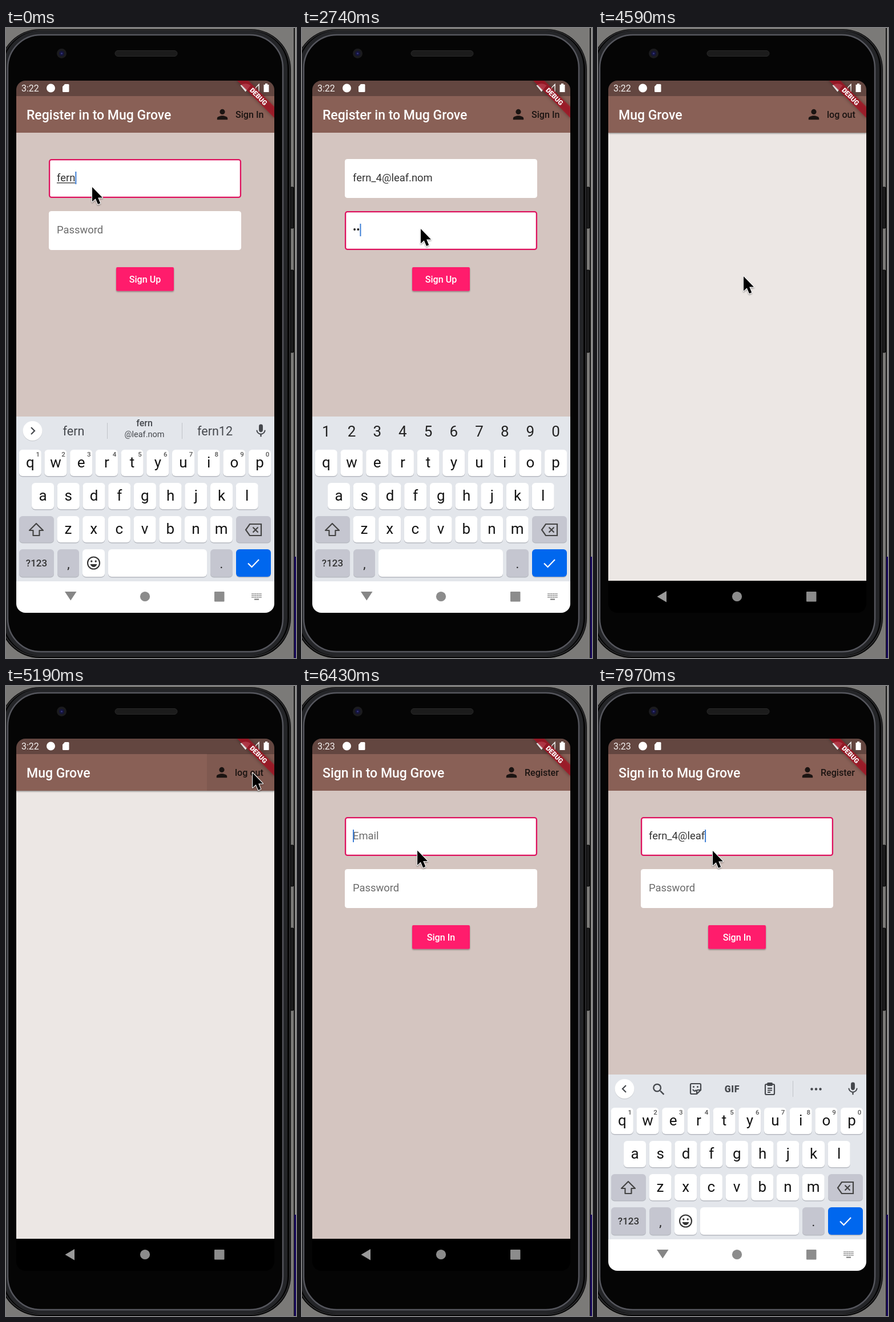
These frames come from a looping animation (508x1101 px, 8000 ms). An HTML page:

```html
<!DOCTYPE html>
<html lang="en">
<head>
<meta charset="utf-8">
<title>Sign-up demo</title>
<style>
html, body { margin: 0; width: 100%; height: 100%; overflow: hidden; background: #7b7a78; }
svg { display: block; width: 100vw; height: 100vh; }
text { font-family: Roboto, sans-serif; white-space: pre; }
.m { font-weight: 500; }
.c { text-anchor: middle; }
</style>
</head>
<body>
<svg id="stage" viewBox="0 0 508 1101"></svg>
<script>
const APP = 'Mug Grove', USER = 'fern', MAIL = 'fern_4@leaf.nom';
const INK = '#45484d';

// Markup helpers
const rect = (x, y, w, h, r, fill, more = '') =>
  `<rect x="${x}" y="${y}" width="${w}" height="${h}" rx="${r}" fill="${fill}" ${more}/>`;
const disc = (x, y, r, fill, more = '') => `<circle cx="${x}" cy="${y}" r="${r}" fill="${fill}" ${more}/>`;
const text = (x, y, size, str, fill, more = '') =>
  `<text x="${x}" y="${y}" font-size="${size}" fill="${fill}" ${more}>${str}</text>`;
const path = (d, fill, more = '') => `<path d="${d}" fill="${fill}" ${more}/>`;
const line = (d, color, width, more = '') => path(d, 'none', `stroke="${color}" stroke-width="${width}" ${more}`);
const icon = (cx, cy, d, fill, s = 1.15) =>
  `<g transform="translate(${cx} ${cy}) scale(${s}) translate(-12 -12)">${path(d, fill)}</g>`;
const group = (id, body, more = '') => `<g id="${id}" ${more}>${body}</g>`;

const PERSON = 'M12 12a4 4 0 1 0 0-8 4 4 0 0 0 0 8zm0 2c-2.67 0-8 1.34-8 4v2h16v-2c0-2.66-5.33-4-8-4z';
const SEARCH = 'M15.5 14h-.79l-.28-.27A6.47 6.47 0 0 0 16 9.5 6.5 6.5 0 1 0 9.5 16c1.61 0 3.09-.59 4.23-1.57l.27.28v.79l5 4.99L20.49 19zM9.5 14a4.5 4.5 0 1 1 0-9 4.5 4.5 0 0 1 0 9z';
const MIC = 'M12 14c1.66 0 3-1.34 3-3V5a3 3 0 0 0-6 0v6c0 1.66 1.34 3 3 3zm5.3-3c0 3-2.54 5.1-5.3 5.1S6.7 14 6.7 11H5c0 3.41 2.72 6.23 6 6.72V21h2v-3.28c3.28-.48 6-3.3 6-6.72z';

function phone() {
  const ring = (x, y, r, color, w) =>
    rect(x, y, 488 - 2 * x, 1102 - 2 * y, r, 'none', `stroke="${color}" stroke-width="${w}"`);
  return rect(0, 0, 508, 1101, 0, '#7b7a78') +
    rect(504, 0, 2, 1101, 0, '#111') + rect(506, 0, 2, 924, 0, '#8d8c8a') +
    rect(505, 924, 3, 177, 0, '#1a0b5c') +
    rect(498, 278, 6, 72, 2, '#1c1c1d', 'stroke="#000"') +
    rect(498, 423, 6, 144, 2, '#1c1c1d', 'stroke="#000"') +
    rect(-11, 2, 510, 1099, 70, '#050505') +
    ring(-9, 4, 68, '#2b2b2d', 2) + ring(-1, 9, 62, '#242528', 8) + ring(3, 12, 58, '#55565d', 2.5) +
    disc(97.5, 44.5, 8.5, '#1b1b1e') + disc(97.5, 44.5, 4.5, '#14143a') + disc(97.5, 44.5, 1.6, '#34347c') +
    rect(191, 39.5, 109, 10, 5, '#1c1c1c', 'stroke="#292929"');
}

function statusBar() {
  return rect(18, 92, 452, 27, 0, '#634640') +
    text(27, 111, 16, '3:22', '#f4f0ef', 'id="clock"') + disc(78.5, 105, 7.5, '#fff') +
    path('M103 98h6q1.5 0 1.5 1.5v11q0 1.5-1.5 1.5h-8.500q-1.5 0-1.500-1.500v-8z', '#fff') +
    path('M419.500 111.500L410.500 100.500Q419.500 94 428.500 100.500z', '#fff') +
    line('M431 111L443 98.500V111z', '#fff', 1.4) + path('M431 111.500l7-7.500v7.500z', '#fff') +
    path('M454 97h4v2h2.500v13h-9V99h2.500z', '#fff');
}

const banner = () => `<g transform="translate(470 92) rotate(45)">` +
  rect(-46, 32.2, 92, 13.8, 0, '#a5161f', 'fill-opacity=".75" filter="url(#soft)"') +
  text(0, 43.3, 11.7, 'DEBUG', '#fff', 'class="c" font-weight="900"') + '</g>';

function form() {
  const field = (id, y) => rect(75, y, 337, 68, 4.600, '#fff') +
    rect(76.100, y + 1.100, 334.800, 65.800, 3.5, 'none', `id="${id}Ring" stroke="#dd115d" stroke-width="2.300"`) +
    text(89, y + 39, 18.4, '', '#333', `id="${id}"`);
  return rect(18, 183, 452, 783, 0, '#d4c5c0') + field('mail', 229) + field('pass', 320) +
    rect(89, 270, 10, 1.3, 0, '#333', 'id="under"') + rect(120, 251, 2, 22, 0, '#3e7fd6', 'id="caret"') +
    rect(193, 418, 101, 41.500, 2.300, '#ff1d6c', 'id="button" filter="url(#low)"') +
    text(243.500, 444.500, 16.1, '', '#fff', 'id="buttonText" class="m c"');
}

function key(x, y, w, fill = '#fff', h = 46) {
  return rect(x, y + 1.4, w, h, 6, '#b7bac1') + rect(x, y, w, h, 6, fill);
}

function keyboard() {
  const GREY = '#c5c6d0', at = i => 42.300 + 44.700 * i;
  const row = (str, x0, y) => [...str].map((c, i) => key(x0 + 44.700 * i - 19.500, y, 39) +
    text(x0 + 44.700 * i, y + 31, 26, c, '#141414', 'class="c"')).join('');
  const digits = [...'1234567890'];
  const round = 'stroke-linecap="round" stroke-linejoin="round"';
  const opener = d => disc(46.500, 705, 17, '#c5c8cd') + disc(46.500, 704, 17, '#fff') + line(d, INK, 2.200);
  const mic = icon(446.500, 704, MIC, INK);
  const divider = x => rect(x, 690, 1, 28, 0, '#c0c3c8');

  const words = opener('M44 698l6 6-6 6') + divider(177) + divider(308) + mic +
    [118.500, 242.500, 366].map((x, i) => text(x, 712, 21.500, '', INK, `id="word${i}" class="c"`)).join('') +
    group('pair', text(242.500, 696, 16, USER, INK, 'class="m c"') +
      text(242.500, 715, 14.500, '@leaf.nom', INK, 'class="c"'));
  const tools = opener('M49 698l-6 6 6 6') + icon(106.500, 705, SEARCH, INK) +
    line('M164 695h14q2 0 2 2v9l-7 7h-9q-2 0-2-2v-14q0-2 2-2zM180 706h-5q-2 0-2 2v5M166 705q3 5 6 1', INK, 2.200) +
    disc(167.500, 700.500, 1.5, INK) + disc(174.500, 700.500, 1.5, INK) +
    text(235, 710, 16, 'GIF', INK, 'class="c" font-weight="900" letter-spacing=".6"') +
    rect(293, 696, 16, 18, 2, 'none', `stroke="${INK}" stroke-width="2.200"`) + rect(296, 693, 10, 6, 2, INK) +
    line('M297 703h8M297 706.500h8M297 710h5', INK, 1.800) + divider(341) +
    [374.500, 382, 389.500].map(x => disc(x, 704.500, 2.200, INK)).join('') + mic;
  const numbers = digits.map((d, i) => text(at(i), 714, 26, d, '#222', 'class="c"')).join('');
  const hints = digits.map((d, i) => text(at(i) + 13.500, 749, 11.500, d, '#555', 'class="m c"')).join('');
  const emoji = key(134, 911, 39, '#fff', 48) + disc(153.500, 935, 10.500, 'none', 'stroke="#333" stroke-width="2.100"') +
    disc(149.800, 932, 1.700, '#333') + disc(157.200, 932, 1.700, '#333') + path('M147.500 937h12q-2 5-6 5t-6-5z', '#333');

  return rect(18, 679, 452, 288, 0, '#e3e6eb') +
    group('words', words) + group('tools', tools) + group('numbers', numbers) +
    row('qwertyuiop', at(0), 737) + group('hints', hints) +
    row('asdfghjkl', 64.600, 795) + row('zxcvbnm', 109, 853) +
    key(23, 853, 61, GREY) + line('M53 866l12 12h-6.500v9h-11v-9H41z', '#444', 2.200, round) +
    key(403, 853, 61, GREY) + line('M427 867h20v20h-20l-7-10zM432.500 872.500l9 9M441.500 872.500l-9 9', '#444', 2.200) +
    key(23, 911, 61, GREY, 48) + text(53.500, 941, 17, '?123', '#333', 'class="m c"') +
    key(90, 911, 38, GREY, 48) + text(109.500, 944, 22, ',', '#222', 'class="c"') +
    group('emoji', emoji + key(179, 911, 173, '#fff', 48)) + group('space', key(134, 911, 218, '#fff', 48)) +
    key(358, 911, 39, GREY, 48) + text(377.500, 944, 22, '.', '#222', 'class="c"') +
    key(403, 911, 61, '#0067ee', 48) + line('M424 935.500l6.500 6.500 12.500-13', '#fff', 2.200);
}

function navBar() {
  const dots = [];
  for (let r = 0; r < 3; r++) for (let i = 0; i < 6; i++) dots.push(rect(430.500 + i * 3, 988 + r * 3, 1.800, 1.800, 0, '#777'));
  return rect(18, 966, 452, 56, 0, '#000', 'id="navBack"') +
    path('M103 985h20.500l-10.250 15.500z', '#868686', 'id="down"') +
    path('M120 984v19.500l-16.500-9.750z', '#999', 'id="back"') +
    disc(243.500, 993.500, 8.600, '#8c8c8c') + rect(365, 985, 17.500, 17.500, 1, '#8c8c8c') +
    group('switcher', dots.join('') + rect(435, 997.500, 8, 2, 0, '#777'));
}

const stage = document.getElementById('stage');
stage.innerHTML = `<defs>
<clipPath id="screen"><rect x="18" y="92" width="452" height="930" rx="16"/></clipPath>
<clipPath id="aboveNav"><rect x="18" y="600" width="452" height="367"/></clipPath>
<filter id="soft" x="-20%" y="-60%" width="140%" height="220%"><feDropShadow dx="0" dy="0" stdDeviation="3" flood-opacity=".5"/></filter>
<filter id="low" x="-20%" y="-30%" width="140%" height="180%"><feDropShadow dx="0" dy="1.500" stdDeviation="1.300" flood-opacity=".38"/></filter>
<filter id="high" x="-20%" y="-30%" width="140%" height="180%"><feDropShadow dx="0" dy="3" stdDeviation="3" flood-opacity=".45"/></filter>
</defs>` + phone() + `<g clip-path="url(#screen)">` +
  group('form', form()) +
  group('home', rect(18, 183, 452, 783, 0, '#ece7e4')) +
  rect(18, 118, 452, 65, 0, '#896056', 'id="appBar"') + statusBar() +
  rect(352, 118, 118, 65, 0, '#000', 'id="press"') +
  text(36, 159.500, 23, '', '#fff', 'id="title" class="m"') +
  group('person', icon(0, 151, PERSON, '#1b1412')) + text(0, 157, 16.1, '', '#1b1412', 'id="action" class="m"') +
  banner() + navBar() + `<g clip-path="url(#aboveNav)">` + group('keys', keyboard()) + '</g></g>' +
  group('mouse', path('M0 0V25.500L5.800 20.200 10 30 14.200 28.200 10.200 18.500H18z', '#000',
    'stroke="#fff" stroke-width="2" stroke-linejoin="round" paint-order="stroke" filter="url(#low)"'));

const el = {};
stage.querySelectorAll('[id]').forEach(n => el[n.id] = n);
const show = (id, on) => el[id].style.display = on ? '' : 'none';
const put = (id, str) => { if (el[id].textContent !== str) el[id].textContent = str; };
const set = (id, name, v) => el[id].setAttribute(name, v);

const ramp = (t, start, len) => {
  const p = Math.min(1, Math.max(0, (t - start) / len));
  return p * p * (3 - 2 * p);
};
const typed = (t, start, step, max) => Math.min(max, Math.max(0, Math.floor((t - start) / step) + 1));

// Pointer moves: start, duration, x, y
const MOVES = [[0, 1, 151, 278], [1250, 430, 208, 351], [3300, 420, 246, 440], [4110, 250, 255, 434],
  [4620, 460, 432, 152], [5880, 180, 443, 155], [6210, 230, 201, 288]];

function pointer(t) {
  let [, , x, y] = MOVES[0];
  for (const [start, len, mx, my] of MOVES) {
    const k = ramp(t, start, len);
    x += (mx - x) * k;
    y += (my - y) * k;
  }
  return [x, y];
}

function draw(t) {
  const late = t >= 4000;
  const home = late && t < 5200;
  const register = !late || (t >= 5720 && t < 6170);
  const inPass = t >= 2000 && !late;
  const inMail = t < 2000 || t >= 6430;

  // Typing and the time since the last keystroke
  let letters, lastKey;
  if (late) {
    const first = typed(t, 6650, 55, 4), rest = typed(t, 7050, 140, 7);
    letters = first + rest;
    lastKey = rest ? 7050 + (rest - 1) * 140 : first ? 6650 + (first - 1) * 55 : 6430;
  } else {
    const rest = typed(t, 150, 105, 11);
    letters = USER.length + rest;
    lastKey = rest ? 150 + (rest - 1) * 105 : -100;
  }
  const mail = MAIL.slice(0, letters);
  const dots = late ? 0 : typed(t, 2540, 122, 6);
  if (inPass) lastKey = dots ? 2540 + (dots - 1) * 122 : 2000;

  show('home', home);
  show('form', !home);
  set('appBar', 'filter', home ? 'url(#low)' : 'none');
  put('clock', t < 5600 ? '3:22' : '3:23');
  put('title', home ? APP : (register ? 'Register in to ' : 'Sign in to ') + APP);
  put('action', home ? 'log out' : register ? 'Sign In' : 'Register');
  const x = home ? 401 : register ? 402 : 390;
  set('action', 'x', x);
  set('person', 'transform', `translate(${x - 23})`);
  const pressed = [5100, 5620, 6040].some(s => t >= s && t < s + 130);
  set('press', 'fill-opacity', pressed ? .07 : 0);

  put('mail', mail || 'Email');
  set('mail', 'fill', mail ? '#333' : '#6b6b6b');
  put('pass', '•'.repeat(dots) || 'Password');
  set('pass', 'fill', dots ? '#222' : '#6b6b6b');
  show('mailRing', inMail);
  show('passRing', inPass);
  const width = inPass ? (dots ? el.pass.getComputedTextLength() : 0) : mail ? el.mail.getComputedTextLength() : 0;
  const word = mail.length > 0 && mail.length <= USER.length;
  show('under', word && inMail);
  set('under', 'width', width);
  show('caret', (inMail || inPass) && (t - lastKey) % 1000 < 500);
  set('caret', 'x', 89 + width);
  set('caret', 'y', inPass ? 342 : 251);
  const held = t >= 3770 && !late;
  set('button', 'fill', held ? '#f21b66' : '#ff1d6c');
  set('button', 'filter', held ? 'url(#high)' : 'url(#low)');
  put('buttonText', register ? 'Sign Up' : 'Sign In');

  // Keyboard
  const up = t < 5000 ? 1 - ramp(t, 3990, 220) : ramp(t, 6440, 190);
  const secret = t >= 2050 && t < 5000;
  show('keys', up > 0);
  set('keys', 'transform', `translate(0 ${288 * (1 - up)})`);
  show('words', !secret && word);
  show('tools', !secret && !word);
  show('numbers', secret);
  show('hints', !secret);
  show('emoji', !secret);
  show('space', secret);
  show('pair', !late);
  (late ? ['fe', 'the', USER] : [USER, '', USER + '12']).forEach((w, i) => put('word' + i, w));
  const open = up > 0;
  set('navBack', 'fill', open ? '#fff' : '#000');
  show('down', open);
  show('switcher', open);
  show('back', !open);

  set('mouse', 'transform', `translate(${pointer(t)})`);
}

function tick(now) {
  draw(now % 8000);
  requestAnimationFrame(tick);
}
draw(0);
requestAnimationFrame(tick);
</script>
</body>
</html>
```
